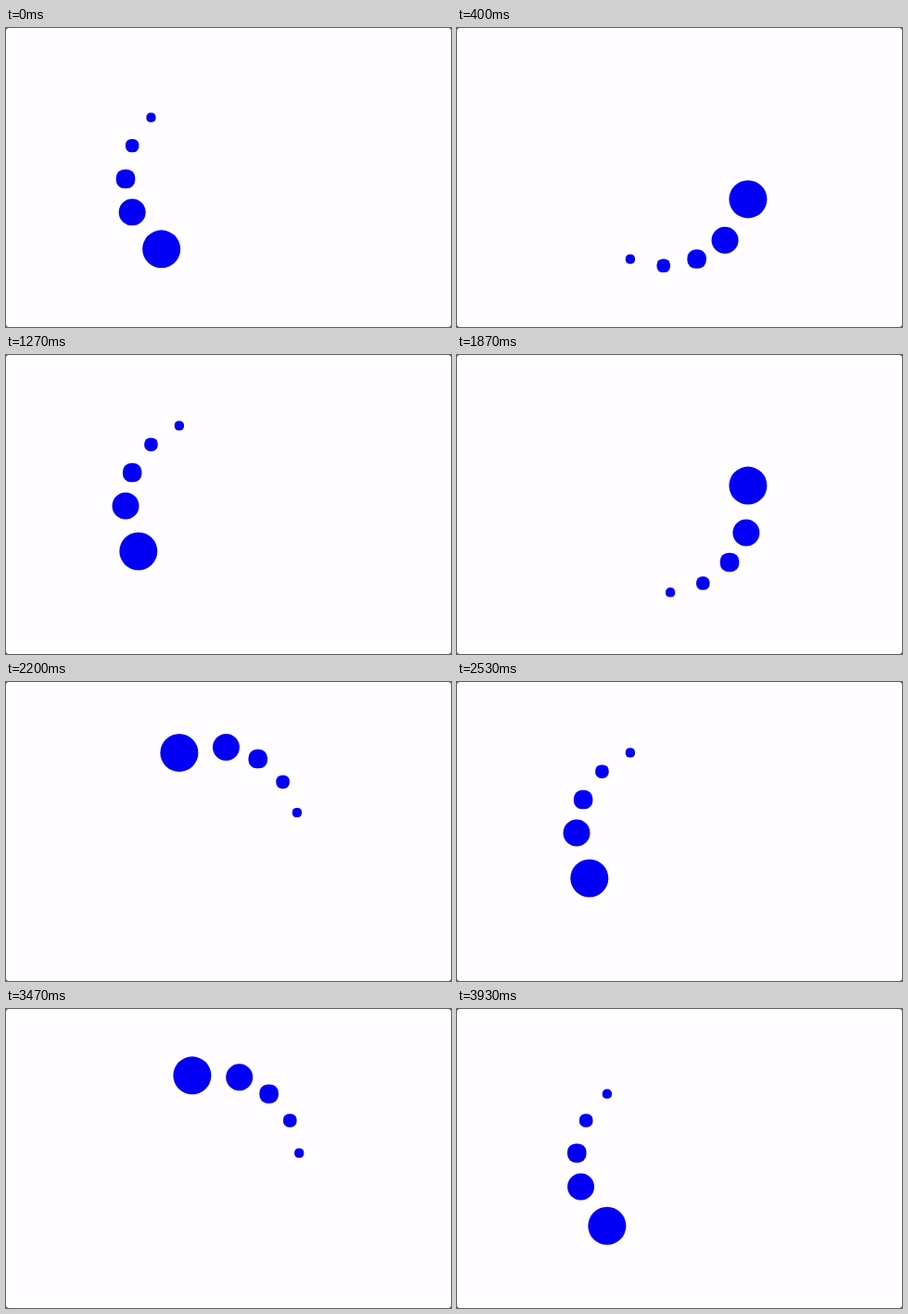
An HTML page for the animation above (3.99 s loop, 480 by 323 pixels).

```html
<!DOCTYPE html>
<html lang="en">
<head>
<meta charset="utf-8">
<title>Spinner</title>
<style>
  html, body { margin: 0; width: 100%; height: 100%; overflow: hidden; background: #444; }
  svg { display: block; width: 480px; height: 323px; }
  #dots { fill: #0300f5; filter: blur(0.45px); }
</style>
</head>
<body>
<svg viewBox="0 0 480 323">
  <rect width="480" height="323" rx="3" fill="#fffdff"/>
  <g id="dots"></g>
</svg>
<script>
const LOOP = 3990, TICK = 200 / 3, LAST = 59;
const CX = 222.75, CY = 163, RING = 93.75;
const STEP = 4.5, START = 216; // degrees clockwise from the top
const COUNT = 5, BIGGEST = 20.5;

// [tick, steps turned]: the spin speeds up and slows down slightly
const SPIN = [[0, 0], [12, 50], [19, 75], [28, 111], [38, 155], [45, 182], [LAST, 239]];

const group = document.getElementById("dots");

// Each dot has half the area of the one before it.
const dots = Array.from({ length: COUNT }, (_, i) => {
  const half = BIGGEST * Math.SQRT1_2 ** i;
  const lag = i && 9 + 22.5 * i;
  const el = document.createElementNS("http://www.w3.org/2000/svg", "rect");
  el.setAttribute("width", half * 2);
  el.setAttribute("height", half * 2);
  el.setAttribute("rx", i < 2 ? half : half * 0.87);
  group.append(el);
  return { el, half, lag };
});

const tickStart = k => Math.round(k * TICK / 10) * 10;

function tickAt(time) {
  const k = Math.min(LAST, Math.floor(time / TICK) + 1);
  return tickStart(k) > time ? k - 1 : k;
}

function stepsAt(tick) {
  const i = Math.max(1, SPIN.findIndex(([t]) => t >= tick));
  const [t0, s0] = SPIN[i - 1], [t1, s1] = SPIN[i];
  return Math.round(s0 + (s1 - s0) * (tick - t0) / (t1 - t0));
}

function draw(time) {
  const lead = START - STEP * stepsAt(tickAt(time));
  for (const { el, half, lag } of dots) {
    const a = (lead + lag) * Math.PI / 180;
    el.setAttribute("x", CX + RING * Math.sin(a) - half);
    el.setAttribute("y", CY - RING * Math.cos(a) - half);
  }
}

const begin = performance.now();
function loop() {
  draw((performance.now() - begin) % LOOP);
  requestAnimationFrame(loop);
}
loop();
</script>
</body>
</html>
```
